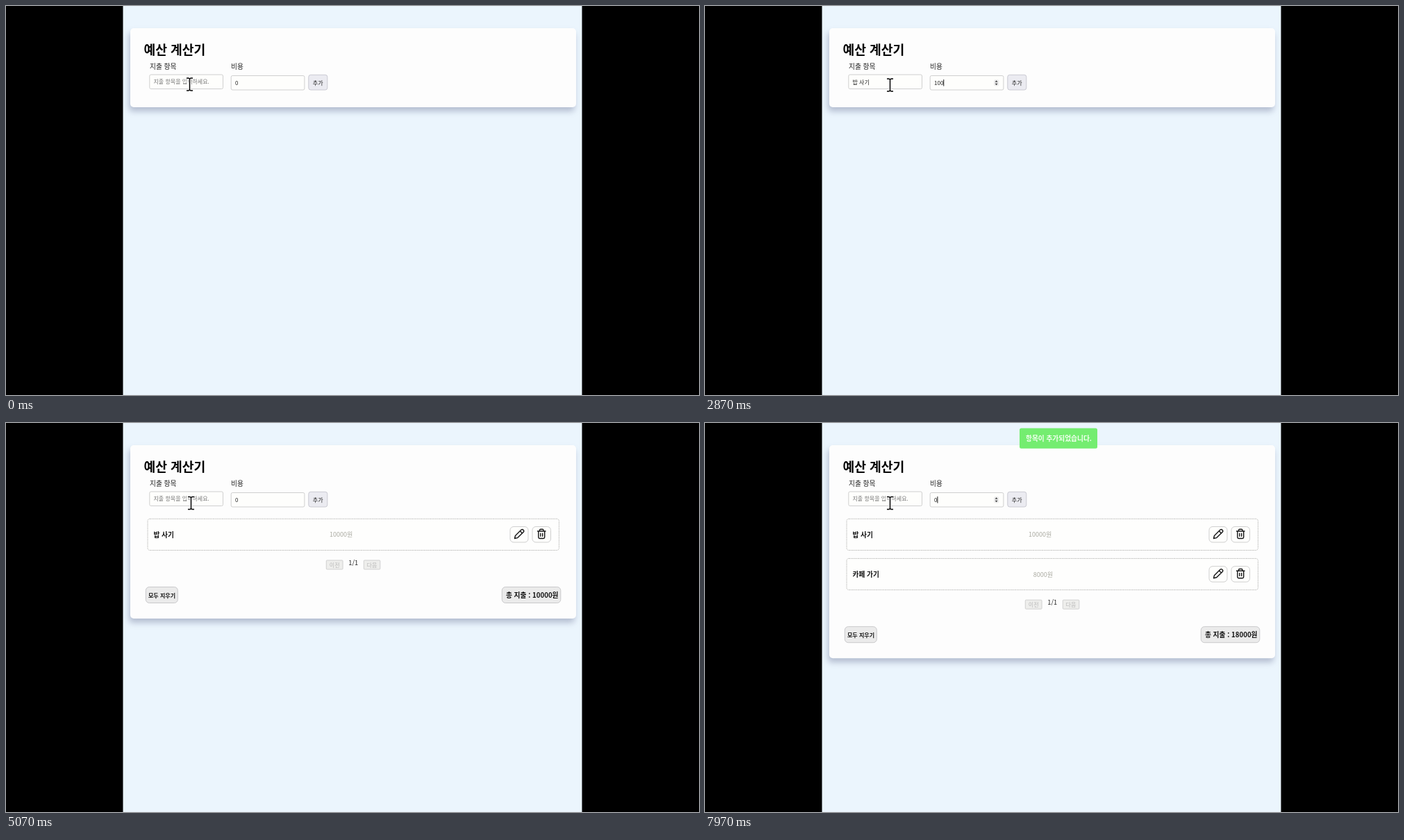
Recreate the animation shown at these times as an HTML page. Size 998 by 561 pixels, loop 8 s.

```html
<!DOCTYPE html>
<html lang="ko">
<head>
<meta charset="utf-8">
<title>예산 계산기</title>
<style>
  html, body { margin: 0; width: 100%; height: 100%; overflow: hidden; background: #000; }
  svg { display: block; width: 100vw; height: 100vh; }
  text { font: 8px "Noto Sans CJK KR", "Noto Sans CJK", "Noto Sans", sans-serif; fill: #222; white-space: pre; }
  .title { font-size: 18.2px; font-weight: 700; fill: #000; }
  .label { font-size: 9.7px; }
  .bold { font-weight: 700; fill: #111; }
  .mid { font-size: 9.7px; }
  .muted { font-size: 9px; fill: #a9a9a0; }
  .faint { fill: #b9b9b9; }
  .hint { fill: #777; }
  .toast { font-size: 9.7px; font-weight: 700; fill: #f4fff2; }
  .card { fill: #fdfdfd; filter: drop-shadow(-2px 6px 4px rgba(70, 80, 120, .33)); }
  .field { fill: #fefefc; stroke: #cfcfcf; }
  .button { fill: #ebebeb; stroke: #c9c9cb; }
  .add { fill: #ebebf1; stroke: #cacad2; }
  .pale { fill: #eeeeec; stroke: #d0d0d0; }
  .row { fill: #fefefd; stroke: #c6c6c4; stroke-dasharray: 2 .6; }
  .icon { fill: none; stroke: #151515; stroke-width: 1.4; stroke-linecap: round; stroke-linejoin: round; }
</style>
</head>
<body>
<svg viewBox="0 0 998 561">
  <defs>
    <g id="actions">
      <rect class="field" x="726" y="149.5" width="26" height="22.5" rx="5"/>
      <rect class="field" x="758" y="149.5" width="26.5" height="22.5" rx="5"/>
      <path class="icon" d="M732.5 166.5l1-4 8.5-8.5q1.5-1.2 3 .2t.2 3l-8.5 8.4zM740.3 155.7l3.2 3.2"/>
      <path class="icon" d="M765.5 156h11.5M768.5 156v-1.3q0-1.4 1.4-1.4h2.7q1.4 0 1.4 1.4v1.3M766.8 156v8.8q0 1.7 1.7 1.7h5.5q1.7 0 1.7-1.7V156M769.8 159.3v4M772.7 159.3v4"/>
    </g>
  </defs>

  <rect width="998" height="561"/>
  <rect x="168.5" width="661" height="561" fill="#ebf5fd"/>
  <rect id="card" class="card" x="179" y="32" width="642" height="114" rx="5"/>

  <text class="title" x="198.5" y="69.8">예산 계산기</text>
  <text class="label" x="207" y="91.3">지출 항목</text>
  <text class="label" x="324" y="91.3">비용</text>
  <rect class="field" x="206.8" y="99" width="105.7" height="20.5" rx="2"/>
  <rect class="field" x="324.2" y="100.5" width="105.7" height="20.5" rx="2"/>
  <rect class="add" x="435.8" y="99.3" width="27" height="21.7" rx="3"/>
  <text x="441.8" y="113.5">추가</text>

  <text id="hint" class="hint" x="212.5" y="112">지출 항목을 입력하세요.</text>
  <text id="item" x="212.5" y="113"></text>
  <rect id="selection" x="329.5" y="106" width="5" height="9.7" fill="#3b73c6"/>
  <text id="cost" x="330" y="113.6"></text>
  <rect id="caret" y="106" width=".9" height="9.5"/>
  <g id="spinner">
    <rect x="416" y="106" width="7.2" height="9.6" rx="2.5" fill="#ededed"/>
    <path d="M417.6 109.8l2-2.5 2 2.5zM417.6 111.8l2 2.5 2-2.5z" fill="#444"/>
  </g>

  <g id="firstRow">
    <rect class="row" x="204" y="138.2" width="592.4" height="45.3" rx="3"/>
    <text class="bold mid" x="212.5" y="164.7">밥 사기</text>
    <text class="muted" x="466" y="164.4">10000원</text>
    <use href="#actions"/>
  </g>
  <g id="secondRow" transform="translate(0 57.2)">
    <rect class="row" x="204" y="138.2" width="592.4" height="45.3" rx="3"/>
    <text class="bold mid" x="212.5" y="164.7">카페 가기</text>
    <text class="muted" x="472.7" y="164.4">8000원</text>
    <use href="#actions"/>
  </g>
  <g id="footer">
    <rect class="pale" x="461.3" y="198" width="23.7" height="13" rx="1"/>
    <text class="faint" x="465.8" y="207.8">이전</text>
    <text x="493.3" y="205" style="font-size:9.3px">1/1</text>
    <rect class="pale" x="515.3" y="198" width="23.5" height="13" rx="1"/>
    <text class="faint" x="519.6" y="207.8">다음</text>
    <rect class="button" x="201.3" y="236.5" width="46" height="23" rx="5"/>
    <text class="bold" x="205" y="251.6">모두 지우기</text>
    <rect class="button" x="714.3" y="236.5" width="84.5" height="23" rx="5"/>
    <text id="total" class="bold mid" x="720" y="251.8"></text>
  </g>

  <g id="toast">
    <rect x="453" y="7.5" width="112" height="29.3" rx="2.5" fill="#74ed70"/>
    <text class="toast" x="462" y="25.8">항목이 추가되었습니다.</text>
  </g>

  <g id="pointer" fill="none">
    <path id="beam" d="M-4.5-9H-1.5L0-8 1.5-9H4.5M0-8V8M-4.5 9H-1.5L0 8 1.5 9H4.5" stroke="#fff" stroke-width="3.4"/>
    <use href="#beam"/>
    <path d="M-4.5-9H-1.5L0-8 1.5-9H4.5M0-8V8M-4.5 9H-1.5L0 8 1.5 9H4.5" stroke="#000" stroke-width="1.5"/>
  </g>
</svg>
<script>
  const LOOP = 8000, ROW = 57.2;
  const ADDED = [3420, 7760], TOAST_TIME = 1200;
  const $ = id => document.getElementById(id);
  const show = (id, on) => $(id).setAttribute('visibility', on ? 'visible' : 'hidden');
  const setText = (id, value) => { if ($(id).textContent !== value) $(id).textContent = value; };

  // Each step holds its start time and value.
  const itemSteps = [
    [0, ''], [700, 'q'], [850, 'qk'], [1010, 'qkq'], [1150, 'qk'], [1230, 'q'], [1310, ''],
    [1450, 'ㅂ'], [1550, '바'], [1650, '밥'], [1750, '밥 '], [1830, '밥 ㅅ'], [1910, '밥 사'],
    [1990, '밥 삭'], [2080, '밥 사기'], [ADDED[0], ''],
    [5650, 'ㅋ'], [5760, '카'], [5870, '캎'], [5980, '카페'], [6120, '카페 '], [6240, '카페 ㄱ'],
    [6350, '카페 가'], [6460, '카페 각'], [6570, '카페 가기'], [ADDED[1], '']
  ];
  const costSteps = [
    [0, '0'], [2550, '1'], [2700, '10'], [2840, '100'], [2970, '1000'], [3100, '10000'], [ADDED[0], '0'],
    [7250, '8'], [7370, '80'], [7480, '800'], [7590, '8000'], [ADDED[1], '0']
  ];
  const focusSteps = [[0, ''], [600, 'item'], [2300, 'cost'], [4560, 'item'], [6850, 'cost']];
  const pointerSteps = [[0, [264.5, 113]], [120, [265.5, 113.5]], [250, [266.5, 114]], [4700, [266.5, 115.5]]];

  const stepAt = (steps, t) => steps.filter(s => s[0] <= t).pop();

  function draw(t) {
    const [itemTime, item] = stepAt(itemSteps, t);
    const [costTime, cost] = stepAt(costSteps, t);
    const [focusTime, focus] = stepAt(focusSteps, t);
    const rows = ADDED.filter(time => time <= t).length;
    const selected = focus === 'cost' && costTime < focusTime;

    setText('item', item);
    setText('cost', cost);
    show('hint', !item);
    show('spinner', focus === 'cost');
    show('selection', selected);
    $('cost').style.fill = selected ? '#fff' : '';

    const idle = t - Math.max(focusTime, focus === 'item' ? itemTime : costTime);
    show('caret', focus && !selected && idle % 1000 < 500);
    if (focus) {
      const start = focus === 'item' ? 212.5 : 330;
      $('caret').setAttribute('x', start + $(focus).getComputedTextLength());
    }

    $('card').setAttribute('height', rows ? 250 + (rows - 1) * ROW : 114);
    show('firstRow', rows > 0);
    show('secondRow', rows > 1);
    show('footer', rows > 0);
    $('footer').setAttribute('transform', `translate(0 ${rows > 1 ? ROW : 0})`);
    setText('total', `총 지출 : ${rows > 1 ? 18000 : 10000}원`);
    show('toast', ADDED.some(time => t >= time && t < time + TOAST_TIME));
    $('pointer').setAttribute('transform', `translate(${stepAt(pointerSteps, t)[1]})`);
  }

  function tick() {
    draw(performance.now() % LOOP);
    requestAnimationFrame(tick);
  }
  tick();
</script>
</body>
</html>
```
